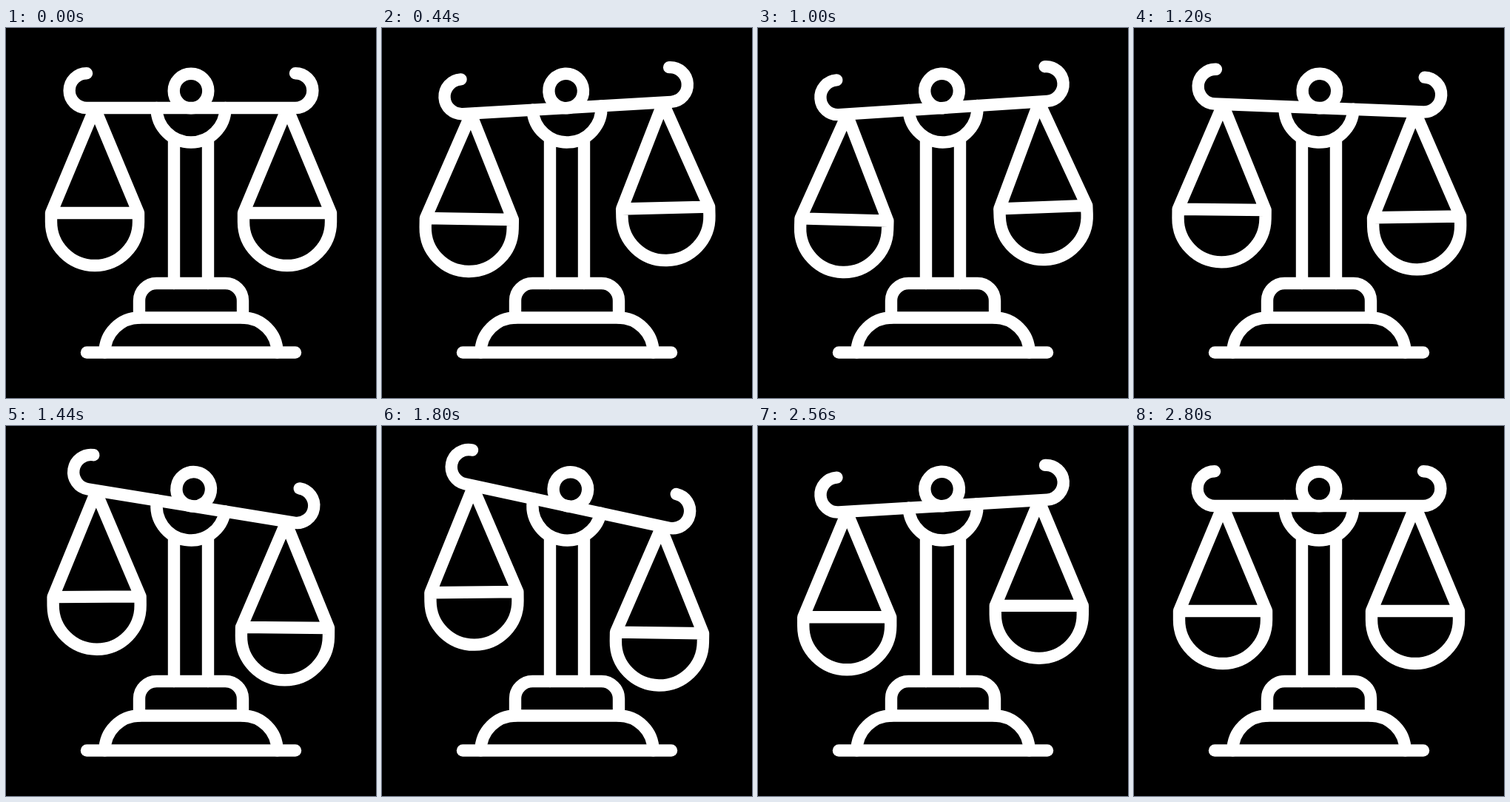
Recreate the animation shown at these times as an HTML page. Size 500x500 px, loop 3000 ms.

```html
<!DOCTYPE html>
<html lang="en">
<head>
<meta charset="utf-8">
<title>Balance scales</title>
<style>
  html, body { margin: 0; width: 100%; height: 100%; overflow: hidden; background: #000; }
  svg { display: block; width: 100%; height: 100%; }
  svg g { fill: none; stroke: #fff; stroke-width: 16.4; stroke-linecap: round; stroke-linejoin: round; }
</style>
</head>
<body>
<svg viewBox="0 0 500 500">
  <defs>
    <path id="pan" d="M0 0.5L-59 142H59ZM-59 142V154A59 59 0 0 0 59 154V142"/>
  </defs>
  <g>
    <path d="M109 438.5H391"/>
    <path d="M133.5 438.5A47 47 0 0 1 180.5 391.5H319.5A47 47 0 0 1 366.5 438.5"/>
    <path d="M180 391.5V368.5A23.5 23.5 0 0 1 203.5 345H296.5A23.5 23.5 0 0 1 320 368.5V391.5"/>
    <path d="M227 149V345M273 149V345"/>
  </g>
  <g id="beam">
    <path d="M109 61.2A23.4 23.4 0 0 0 109 108H391A23.4 23.4 0 0 0 391 61.2"/>
    <circle cx="250" cy="85" r="23.3"/>
    <path d="M203.5 108A46.5 46.5 0 0 0 296.5 108"/>
  </g>
  <g id="left"><use href="#pan"/></g>
  <g id="right"><use href="#pan"/></g>
</svg>
<script>
  const LOOP = 3000, STEP = 40;
  const PIVOT = { x: 250, y: 108 }, ARM = 130, SAG = 0.17;

  const el = id => document.getElementById(id);
  const beam = el('beam'), left = el('left'), right = el('right');

  // Eased 0..1 between two times
  function ramp(t, from, to) {
    const p = Math.min(1, Math.max(0, (t - from) / (to - from)));
    return (1 - Math.cos(Math.PI * p)) / 2;
  }

  // Beam angle in degrees: right side up, left side up, a smaller rebound, rest
  const tilt = t => -8 * ramp(t, 240, 690) + 20.9 * ramp(t, 690, 1725)
    - 19.5 * ramp(t, 1725, 2330) + 6.6 * ramp(t, 2330, 2800);

  // How far the pans swing outwards, 1 at most
  const sway = t => ramp(t, 240, 690) - 1.25 * ramp(t, 690, 1600) + 0.25 * ramp(t, 2080, 2560);

  function hang(pan, side, angle, swing) {
    const a = angle * Math.PI / 180;
    const x = PIVOT.x + side * ARM * Math.cos(a);
    const y = PIVOT.y + side * ARM * Math.sin(a) + SAG * Math.abs(angle);
    pan.setAttribute('transform', `translate(${x} ${y}) rotate(${swing})`);
  }

  function draw(t) {
    const angle = tilt(t), swing = sway(t);
    beam.setAttribute('transform', `rotate(${angle} ${PIVOT.x} ${PIVOT.y})`);
    hang(left, -1, angle, 2.3 * swing);
    hang(right, 1, angle, -3.3 * swing);
  }

  const start = performance.now();
  function tick() {
    const t = (performance.now() - start) % LOOP;
    draw(Math.floor(t / STEP) * STEP);
    requestAnimationFrame(tick);
  }
  tick();
</script>
</body>
</html>
```
